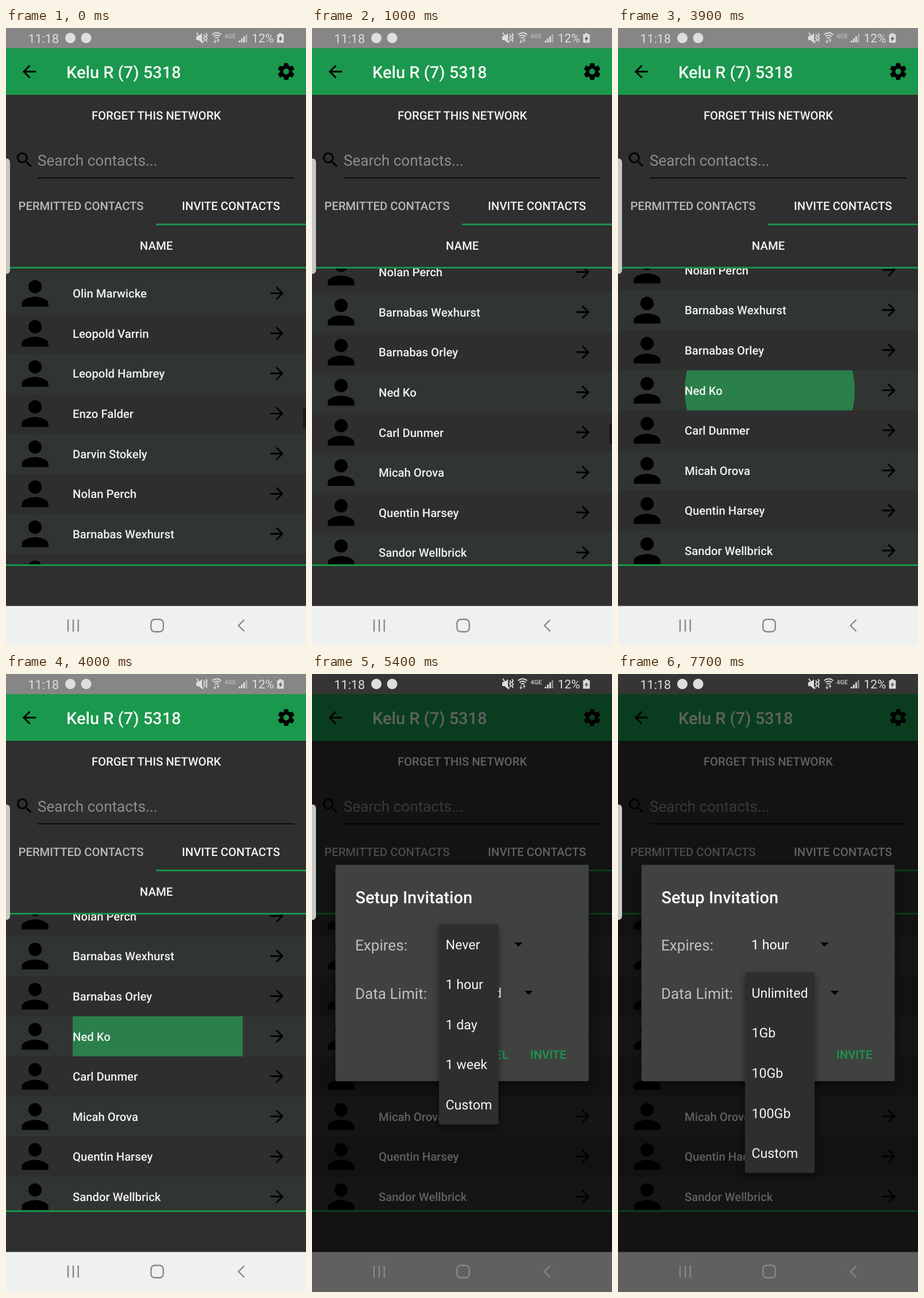
An HTML page that plays this animation: 522 px wide and 1073 px high, repeating every 8 s.

```html
<!DOCTYPE html>
<html lang="en">
<head>
<meta charset="utf-8">
<title>Invite contacts</title>
<style>
html, body { margin: 0; width: 100%; height: 100%; overflow: hidden; background: #2e2f2e; }
svg { display: block; font-family: Roboto, sans-serif; text-rendering: geometricPrecision; }
.med { font-weight: 500; }
.float { filter: drop-shadow(0 5px 7px rgba(0, 0, 0, .45)); }
</style>
</head>
<body>
<svg id="stage" width="522" height="1073" viewBox="0 0 522 1073"></svg>
<script>
const LOOP = 8000, STEP = 100, ROW = 69.6, LIST_TOP = 426;
const GREEN = '#1a984d';
const NAMES = ['Olin Marwicke', 'Leopold Varrin', 'Leopold Hambrey', 'Enzo Falder',
  'Darvin Stokely', 'Nolan Perch', 'Barnabas Wexhurst', 'Barnabas Orley', 'Ned Ko',
  'Carl Dunmer', 'Micah Orova', 'Quentin Harsey', 'Sandor Wellbrick', 'Rufus Tamblin'];
const PRESSED_ROW = 8;

const ICONS = {
  person: 'M12 12c2.21 0 4-1.79 4-4s-1.79-4-4-4-4 1.79-4 4 1.79 4 4 4zm0 2c-2.67 0-8 1.34-8 4v2h16v-2c0-2.66-5.33-4-8-4z',
  forward: 'M12 4l-1.41 1.41L16.17 11H4v2h12.17l-5.58 5.59L12 20l8-8z',
  back: 'M20 11H7.83l5.59-5.59L12 4l-8 8 8 8 1.41-1.41L7.83 13H20v-2z',
  search: 'M15.5 14h-.79l-.28-.27a6.5 6.5 0 1 0-.7.7l.27.28v.79l5 5L20.5 19l-5-5zm-6 0a4.5 4.5 0 1 1 0-9 4.5 4.5 0 0 1 0 9z'
};

// y is the middle of the capital letters
const text = (str, x, y, size, fill, more = '') =>
  `<text x="${x}" y="${y + size * .355}" font-size="${size}" fill="${fill}" ${more}>${str}</text>`;
const medium = (str, x, y, fill, size = 20.3, more = '') =>
  text(str, x, y, size, fill, `class="med" ${more}`);
const rect = (x, y, w, h, fill, more = '') =>
  `<rect x="${x}" y="${y}" width="${w}" height="${h}" fill="${fill}" ${more}/>`;
const icon = (name, cx, cy, scale = 1.45) =>
  `<path d="${ICONS[name]}" transform="translate(${cx - 12 * scale} ${cy - 12 * scale}) scale(${scale})"/>`;
const caret = (cx, cy) => `<path d="M${cx - 7.3} ${cy - 3.5}h14.6l-7.3 7.3z"/>`;

function gear(cx, cy) {
  const teeth = [0, 60, 120].map(a =>
    `<path d="M-4.500 -9l1-5.500h7l1 5.500v18l-1 5.500h-7l-1-5.500z" transform="rotate(${a})"/>`).join('');
  return `<g transform="translate(${cx} ${cy})">${teeth}
    <circle r="10.8"/><circle r="5.1" fill="${GREEN}"/></g>`;
}

function contact(name, i) {
  const top = LIST_TOP + i * ROW, mid = top + ROW / 2;
  const ripple = i === PRESSED_ROW
    ? `<g clip-path="url(#cell)"><circle id="ripple" cx="264" cy="${mid}" fill="#289654"/></g>` : '';
  return rect(0, top, 522, ROW, i % 2 ? '#2e2e2e' : '#313531') + ripple +
    icon('person', 50.6, mid - .1, 2.9) + medium(name, 116, mid + .2, '#f1f2f0') +
    icon('forward', 471.4, mid - .2);
}

function menu(id, y, width, items, pressed) {
  const options = items.map((label, i) => text(label, 232.5, y + ROW * (i + .5) + .4, 23.2, '#f6f6f5'));
  const shade = pressed ? rect(221, y + ROW * pressed, width, ROW, '#535553', 'id="pressed"') : '';
  return `<g id="${id}" class="float">${rect(221, y, width, ROW * items.length, '#2d2f2d', 'rx="3"')}
    ${shade}${options.join('')}</g>`;
}

const page = `
  ${rect(0, 0, 522, 1073, '#2e2f2e')}
  <g clip-path="url(#list)"><g id="rows">${NAMES.map(contact).join('')}</g></g>
  ${rect(517, 659, 5, 36.5, '#191a19', 'id="thumb"')}
  ${rect(0, 0, 522, 35, '#868686')}
  ${rect(0, 35, 522, 81, GREEN)}
  ${icon('back', 40.5, 75.8)}
  ${medium('Kelu R (7) 5318', 105, 76.7, '#f3f6f3', 29)}
  ${gear(487.5, 75.6)}
  ${medium('FORGET THIS NETWORK', 261.5, 151.8, '#f3f4f2', 20.3, 'text-anchor="middle"')}
  ${icon('search', 32, 229)}
  ${text('Search contacts...', 55, 230, 26.1, '#8c8e8b')}
  ${rect(55, 259.5, 447, 1.5, '#000')}
  ${medium('PERMITTED CONTACTS', 21.5, 308.3, '#b7b9b6')}
  ${medium('INVITE CONTACTS', 306, 308.3, '#f3f4f2')}
  ${rect(261, 339.6, 261, 2.9, GREEN)}
  ${medium('NAME', 261.5, 378, '#f3f4f2', 20.3, 'text-anchor="middle"')}
  ${rect(0, 414.7, 522, 2.9, GREEN)}
  ${rect(0, 931.2, 522, 2.9, GREEN)}
  ${rect(0, 1003.5, 522, 69.5, '#eff1ee')}`;

const dialog = `<g id="dialog">
  ${rect(40.7, 331.3, 440.8, 375.6, '#404240', 'rx="3" class="float"')}
  ${medium('Setup Invitation', 75.5, 387.3, '#fff', 29)}
  ${text('Expires:', 75, 470.3, 26.1, '#bfc0bf')}
  ${text('Never', 232, 469.8, 23.2, '#fff', 'id="expires"')}
  ${caret(359.3, 469.5)}
  ${text('Data Limit:', 75, 554.3, 26.1, '#bfc0bf')}
  ${text('Unlimited', 232, 553.8, 23.2, '#fff')}
  ${caret(377.2, 553.5)}
  ${medium('CANCEL', 265, 661, GREEN)}
  ${medium('INVITE', 380, 661, GREEN)}</g>`;

const bars = [0, 1, 2, 3].map(i => rect(405 + i * 4, 22 - i * 3.8, 2.8, 3 + i * 3.8, '#dedede', i > 2 ? 'opacity=".5"' : ''));
const statusBar = `
  ${text('11:18', 38.5, 18, 21.5, '#dedede')}
  <circle cx="112" cy="17.3" r="9" fill="#dedede"/><circle cx="139.5" cy="17.3" r="9" fill="#dedede"/>
  <path d="M331 14h4l6-5v17l-6-5h-4z" fill="#dedede"/>
  <g fill="none" stroke="#dedede" stroke-width="1.9">
    <path d="M332 8l11 18M344 11l2 3-2 3 2 3-2 3M348 9l2 3-2 3 2 3-2 3 2 3"/>
    <path d="M358.500 11.500q8-6.500 16 0M361 14.700q5.500-4.500 11 0M363.500 17.800q3-2.500 6 0"/>
    <path d="M363.500 20v5M369 20v5M361.500 23l2 2.500 2-2.500M367 22l2-2.500 2 2.500" stroke-width="1.200"/>
  </g>
  ${text('4GE', 380, 14, 11, '#b2b2b2', 'font-weight="700"')}
  ${bars.join('')}
  ${text('12%', 427.5, 18, 21, '#dedede')}
  <path d="M475 9h5v2h3.300v14.500h-11.600V11h3.300z" fill="#dedede"/>
  <path d="M479 13l-5 6.500h3l-1 4.500 5-6.500h-3z" fill="#5b5b5b"/>`;

const navIcons = `<g fill="none" stroke="#878986" stroke-width="2.4">
  <path d="M108 1027v21M117 1027v21M125.700 1027v21"/>
  <rect x="252.300" y="1026.800" width="21.400" height="21.400" rx="6.500"/>
  <path d="M414.500 1027.500l-10 10 10 10"/></g>`;

document.getElementById('stage').innerHTML = `
  <defs>
    <clipPath id="list">${rect(0, 417, 522, 514.5, '#000')}</clipPath>
    <clipPath id="cell">${rect(116, LIST_TOP + PRESSED_ROW * ROW, 296, ROW, '#000')}</clipPath>
  </defs>
  ${page}
  ${rect(0, 0, 522, 1073, '#000', 'id="dim"')}
  ${dialog}
  ${menu('expiryMenu', 434.2, 103.3, ['Never', '1 hour', '1 day', '1 week', 'Custom'], 1)}
  ${menu('limitMenu', 518.3, 121.2, ['Unlimited', '1Gb', '10Gb', '100Gb', 'Custom'])}
  ${statusBar}${navIcons}
  <path d="M0 226.500q7 0 7 7v186.500q0 7-7 7z" fill="#c6c8c5"/>`;

// [time, value] steps; each value holds until the next
const TRACKS = {
  scroll: [[0, 0], [100, 70], [200, 160], [300, 225], [400, 265], [500, 280],
    [800, 310], [900, 360], [1000, 385], [1100, 387.5], [1200, 388.5]],
  thumb: [[0, 1], [1100, .5], [1200, 0]],
  rippleRadius: [[0, 0], [3800, 95], [3900, 148], [4000, 153]],
  ripple: [[0, .76], [4100, .55], [4200, .25], [4300, 0]],
  dim: [[0, 0], [4200, .2], [4300, .45], [4400, .6]],
  dialog: [[0, 0], [4200, .3], [4300, .8], [4400, 1]],
  expiryMenu: [[0, 0], [5100, .35], [5200, .8], [5300, 1], [6300, .87], [6400, .35], [6500, 0]],
  pressed: [[0, 0], [6000, .5], [6100, 1]],
  limitMenu: [[0, 0], [6900, .35], [7000, .8], [7100, 1]]
};
const valueAt = (track, t) => TRACKS[track].reduce((v, [time, next]) => t >= time ? next : v, 0);
const el = id => document.getElementById(id);

function draw(t) {
  const scroll = valueAt('scroll', t), shown = valueAt('dialog', t), scale = .9 + .1 * shown;
  for (const id of ['thumb', 'ripple', 'dim', 'dialog', 'expiryMenu', 'pressed', 'limitMenu'])
    el(id).setAttribute('opacity', valueAt(id, t));
  el('rows').setAttribute('transform', `translate(0 ${-scroll})`);
  el('thumb').setAttribute('y', 659 + scroll * .071);
  el('ripple').setAttribute('r', valueAt('rippleRadius', t));
  el('dialog').setAttribute('transform', `translate(261 519) scale(${scale}) translate(-261 -519)`);
  el('expires').textContent = t < 6200 ? 'Never' : '1 hour';
}

const start = performance.now();
let lastStep = -1;
function tick() {
  const step = Math.floor((performance.now() - start) % LOOP / STEP);
  if (step !== lastStep) draw((lastStep = step) * STEP);
  requestAnimationFrame(tick);
}
tick();
</script>
</body>
</html>
```
